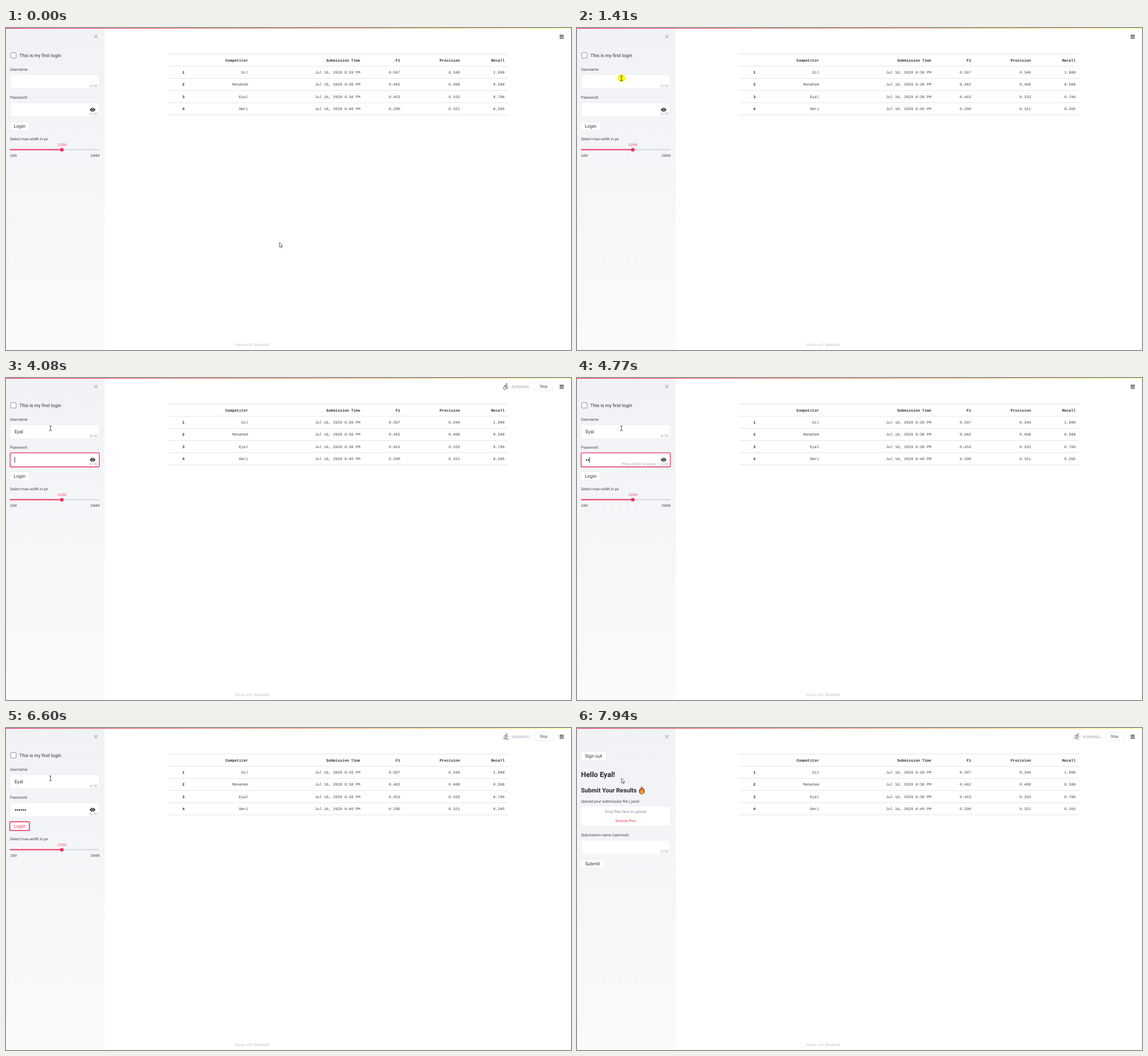
Animation of 992 by 565 pixels, one loop 8000 ms. Source, as an HTML page:

```html
<!DOCTYPE html>
<html lang="en">
<head>
<meta charset="utf-8">
<title>Leaderboard login</title>
<style>
html, body { margin: 0; width: 100%; height: 100%; overflow: hidden; background: #fff; }
svg { display: block; }
text { font: 6.7px Roboto, sans-serif; fill: #41434c; text-rendering: geometricPrecision; white-space: pre; }
.body { font-size: 8.24px; fill: #31333f; }
.mono { font: 6.63px "Liberation Mono", monospace; fill: #3c3e48; }
.bold { font-weight: 700; fill: #262730; }
.end { text-anchor: end; }
.mid { text-anchor: middle; }
.hint { fill: #a3a8b4; }
.box { fill: #fff; stroke: #e9ebf0; stroke-width: .8; }
.focus { fill: none; stroke: #e8305f; stroke-width: 1.3; }
.line { fill: none; stroke: #80838d; stroke-width: 1.25; stroke-linecap: round; stroke-linejoin: round; }
</style>
</head>
<body>
<svg id="stage" width="992" height="565" viewBox="0 0 992 565"></svg>
<script>
const text = (x, y, s, cls = '', more = '') => `<text x="${x}" y="${y}" class="${cls}" ${more}>${s}</text>`;
const rect = (x, y, w, h, cls, more = '') =>
  `<rect x="${x}" y="${y}" width="${w}" height="${h}" rx="2" class="${cls}" ${more}/>`;
const field = y => rect(7.5, y, 156, 24.5, 'box');
const focus = (id, y) => rect(7.2, y, 156.6, 24.7, 'focus', `id="${id}"`);
const button = (x, y, w, s, more = '') =>
  rect(x, y, w, 15, 'box') + text(x + w / 2, y + 10.6, s, 'body mid', more);

const user = 'Eyal';
const columns = [313.5, 425, 622, 692, 797, 875.5];
const rows = [
  ['', 'Competitor', 'Submission Time', 'F1', 'Precision', 'Recall'],
  ['1', 'Gil', 'Jul 16, 2020 8:39 PM', '0.507', '0.340', '1.000'],
  ['2', 'Menahem', 'Jul 16, 2020 8:38 PM', '0.482', '0.408', '0.588'],
  ['3', user, 'Jul 16, 2020 8:38 PM', '0.453', '0.333', '0.706'],
  ['4', 'Omri', 'Jul 16, 2020 8:40 PM', '0.290', '0.321', '0.265']
];
const table = rows.map((row, r) => row.map((s, c) =>
  text(columns[c], 58.9 + r * 21.25, s, 'mono end' + (r && c ? '' : ' bold'))).join('')).join('') +
  `<path d="${[0, 1, 2, 3, 4, 5].map(i => `M284 ${45.8 + i * 21.3}H882`).join('')}" stroke="#dfe1e7" stroke-width=".9"/>`;

const loginPanel = `<g id="login">
  <rect x="8.2" y="43.2" width="9.6" height="9.6" rx="1.8" fill="#fff" stroke="#8c8f99"/>
  ${text(23.5, 50.9, 'This is my first login', 'body')}
  ${text(7, 74.7, 'Username:')}${field(82)}${focus('userFocus', 82)}
  ${text(15, 97, '', 'body', 'id="userText"')}${text(161, 103.8, '', 'hint end', 'id="userHint"')}
  ${text(7, 124.4, 'Password:')}${field(131.3)}${focus('passFocus', 131.3)}
  <g id="dots" fill="#262730">${[0, 1, 2, 3, 4, 5].map(i => `<circle cx="${16.8 + i * 3.4}" cy="143.7" r="1.2"/>`).join('')}</g>
  ${text(161, 153, '', 'hint end', 'id="passHint"')}
  <path d="M147 143.5Q152 136.6 157 143.5Q152 150.4 147 143.5Z" fill="#1f2029"/>
  <circle cx="152" cy="143.5" r="1.8" fill="#1f2029" stroke="#fff" stroke-width=".9"/>
  <path id="caret" stroke="#262730" stroke-width=".9"/>
  ${button(6.8, 164.6, 34, 'Login', 'id="loginText"')}
  <g id="loginFocus">${rect(5.9, 163.7, 35.8, 16.8, 'focus', 'opacity=".35"')}${rect(6.8, 164.6, 34, 15, 'focus')}</g>
  ${text(7, 197.2, 'Select max-width in px')}
  ${text(98, 206.5, '1200', 'mono mid', 'style="fill:#f0486a"')}
  <path d="M98 213.6H164" stroke="#d5d8e4" stroke-width="2"/>
  <path d="M7 213.6H98" stroke="#f63366" stroke-width="2"/>
  <circle cx="98" cy="213.6" r="3.2" fill="#f0305f"/>
  ${text(7, 226.3, '100', 'mono')}${text(164.5, 226.3, '2000', 'mono end')}
</g>`;

const homePanel = `<g id="home">
  ${button(7, 41.5, 44, 'Sign out')}
  ${text(7, 86.2, `Hello ${user}!`, 'bold', 'style="font-size:12.7px"')}
  ${text(7, 113, 'Submit Your Results', 'bold', 'style="font-size:10.7px"')}
  <path d="M113 103.3Q118.6 106.5 118.4 111.5Q117.8 115.6 113.8 115.6Q109.4 115.6 109.2 111.2Q109.3 108.5 111 106.6L111.8 108Q113.3 106.3 113 103.3Z" fill="#ef7a22" stroke="#55291c" stroke-width=".9"/>
  <path d="M114 109Q116.6 112 115.8 115H112Q111 112 114 109Z" fill="#f9b23c"/>
  ${text(7, 130.8, 'Upload your submission file (.json)')}
  ${rect(6.8, 137, 157.8, 35.3, 'box')}
  ${text(85.5, 149.4, 'Drop files here to upload', 'mid', 'style="fill:#858a99"')}
  ${text(85.5, 165, 'browse files', 'mid', 'style="fill:#ee4050"')}
  ${text(7, 190, 'Submission name (optional):')}${field(197)}
  ${text(161, 219, '0/30', 'hint end')}
  ${button(7, 230.4, 40.4, 'Submit')}
</g>`;

const head = (x, y) => `<circle cx="${x}" cy="${y}" r="1.3" fill="#80838d"/>`;
const poses = [
  head(1.6, -4.5) + '<path class="line" d="M.6-2.4L0 1L-3.2 4.4M0 1L2 2.4L2.6 5M-3.4-.2L.6-2.4L3.6 0M-4.6 3L4.8 5"/>',
  head(2, -4.4) + '<path class="line" d="M1-2.4L-.6 1.2L1.6 2.4L2 5M-.6 1.2L-1.4 3.2L-4.4 2.6M-3.4-.2L-2.6-2.2L1-2.4L2.2-.6L4.2-.4"/>',
  head(1.4, -4.4) + '<path class="line" d="M.8-2.4L-.4.8H2.6L4 4M-3-1L.8-2.4L3-1"/><circle class="line" cx="-1.4" cy="2.2" r="2.5"/>'
];

document.getElementById('stage').innerHTML = `
  <linearGradient id="side" x2="0" y2="1"><stop stop-color="#f0f2f6"/><stop offset="1" stop-color="#fafafa"/></linearGradient>
  <linearGradient id="bar"><stop stop-color="#f63366"/><stop offset="1" stop-color="#fffd80"/></linearGradient>
  <rect width="992" height="565" fill="#fff"/>
  <rect width="173" height="565" fill="url(#side)"/>
  <rect width="992" height="1.2" fill="url(#bar)"/>
  <path d="M154.9 12.2l5.6 5.6m0-5.6l-5.6 5.6" stroke="#b3b6be" stroke-width="1.4"/>
  <path d="M972 12.6h7.3m-7.3 2.6h7.3m-7.3 2.6h7.3" stroke="#262730" stroke-width="1.3"/>
  ${table}
  ${text(402.5, 557.6, 'Made with <tspan fill="#b9bdc8">Streamlit</tspan>', '', 'style="fill:#c9ccd5"')}
  <g id="running">
    <g transform="translate(877.5 15)">${poses.map((p, i) => `<g id="pose${i}">${p}</g>`).join('')}</g>
    ${text(888, 17.5, 'RUNNING...', 'hint', 'style="font-size:7px"')}
    ${rect(927.6, 7.5, 33, 14.8, 'box')}${text(944, 17.4, 'Stop', 'mid')}
  </g>
  ${loginPanel}${homePanel}
  <circle id="click" cx="78" cy="88" r="6.8" fill="#f8f51e" opacity=".85"/>
  <path id="arrow" d="M0 0V8.6L2 6.9L3.3 9.8L4.7 9.2L3.4 6.4H5.9Z" fill="#fff" stroke="#3a3a42" stroke-width=".8"/>
  <path id="beam" d="M-2.2-3.8H-.6L0-3.3L.6-3.8H2.2M0-3.3V4M-2.2 4.5H-.6L0 4L.6 4.5H2.2" fill="none" stroke="#33343c" stroke-width=".9"/>`;

const el = id => document.getElementById(id);
const show = (id, on) => el(id).setAttribute('opacity', +on);
const ramp = (t, a, b) => Math.min(1, Math.max(0, (t - a) / (b - a)));
const within = (t, a, b) => t >= a && t < b;
const passed = (t, times) => times.filter(x => t >= x).length;
const hint = (n, typing) => (typing && n ? 'Press Enter to apply  •  ' : '') + n + '/30';

function drawCursor(t) {
  const p = ramp(t, 400, 1230), e = p * p * (3 - 2 * p);
  const x = 480 - 402 * e, y = 376 - 288 * e;
  const overField = x < 163 && (within(y, 82, 107) || within(y, 131, 156));
  const beam = overField && t < 7400;
  for (const id of ['arrow', 'beam']) el(id).setAttribute('transform', `translate(${x} ${y})`);
  show('beam', beam);
  show('arrow', !beam);
  show('click', within(t, 1410, 1570));
}

function drawForm(t) {
  const typed = passed(t, [2620, 2900, 3180, 3370]);
  const dots = passed(t, [4560, 4720, 4900, 5260, 5340, 5410]);
  const inUser = within(t, 1470, 3830), inPass = within(t, 3830, 6100);
  el('userText').textContent = user.slice(0, typed);
  el('userHint').textContent = hint(typed, inUser);
  el('passHint').textContent = hint(dots, inPass);
  [...el('dots').children].forEach((dot, i) => dot.setAttribute('opacity', +(i < dots)));
  show('userFocus', ramp(t, 1450, 1520) * (1 - ramp(t, 3820, 3900)));
  show('passFocus', ramp(t, 3820, 3900) * (1 - ramp(t, 6090, 6170)));
  const caretX = inUser ? 15.4 + el('userText').getComputedTextLength() : 15.4 + dots * 3.4;
  el('caret').setAttribute('d', `M${caretX} ${inUser ? 88.6 : 138.4}v10.4`);
  show('caret', inUser ? !within(t, 1980, 2490) : inPass && !within(t, 4360, 4560) && t < 5970);
  const pressed = ramp(t, 6530, 6600);
  show('loginFocus', pressed);
  el('loginText').style.fill = pressed > .5 ? '#f63366' : '';
  show('login', t < 7310);
  show('home', t >= 7310);
}

function drawStatus(t) {
  show('running', t < 5000 ? ramp(t, 3910, 4030) * (1 - ramp(t, 4400, 4540)) : ramp(t, 6150, 6300));
  const step = t < 5000 ? Math.floor((t - 4060) / 200) + 8 : Math.floor((t - 7140) / 200) + 60;
  poses.forEach((_, i) => show('pose' + i, (step + 3000) % 3 === i));
}

const start = performance.now();
function frame() {
  const t = (performance.now() - start) % 8000;
  drawCursor(t);
  drawForm(t);
  drawStatus(t);
  requestAnimationFrame(frame);
}
frame();
</script>
</body>
</html>
```
